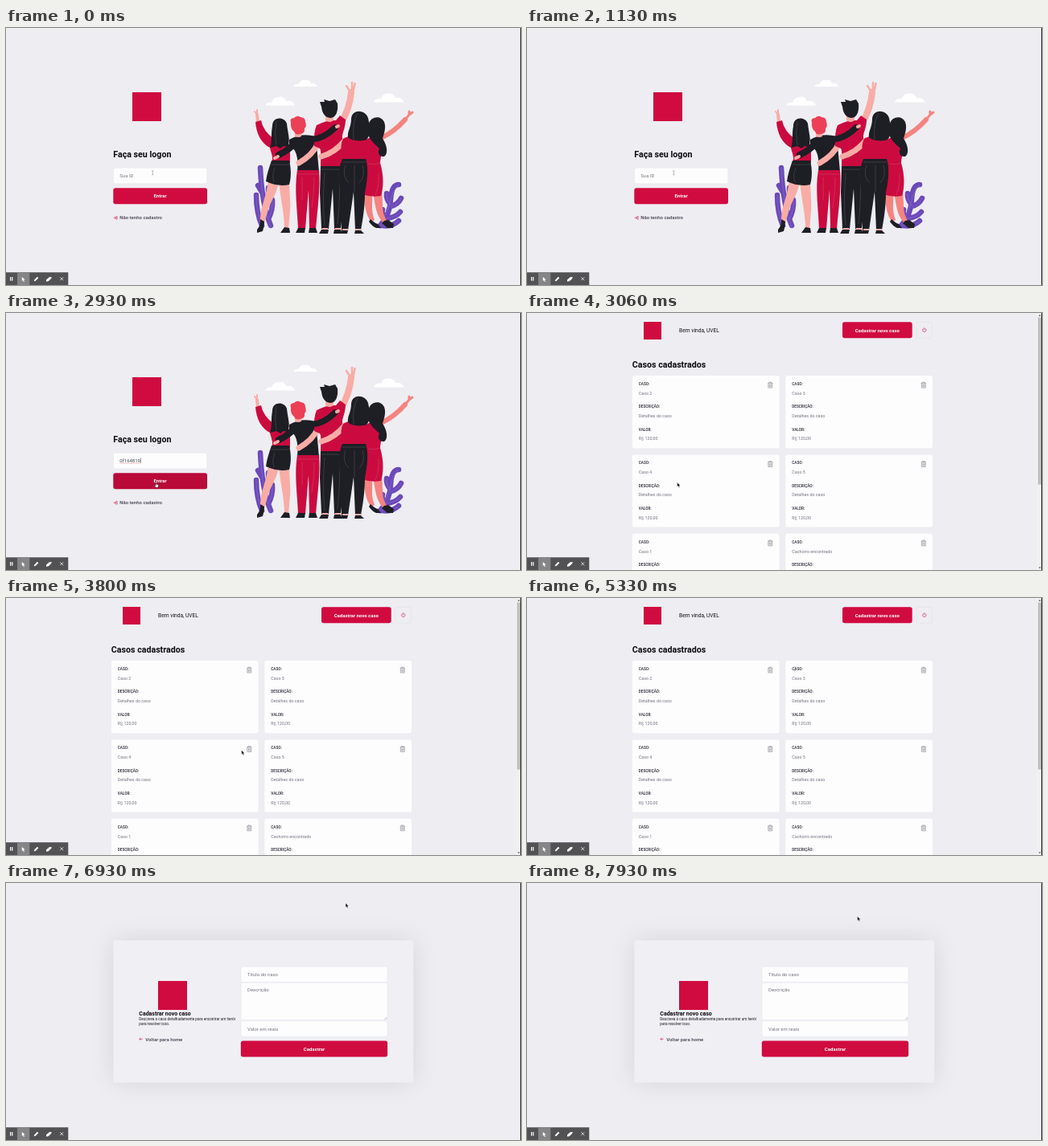
Animation, 640 px wide and 320 px high, one loop 8000 ms. Source, as an HTML page:

```html
<!DOCTYPE html>
<html lang="pt">
<head>
<meta charset="utf-8">
<title>Logon</title>
<style>
  html, body { margin: 0; width: 100%; height: 100%; overflow: hidden; background: #eeedf2; }
  svg { display: block; width: 100%; height: 100%; }
  text { font: 6px Roboto, sans-serif; fill: #737380; white-space: pre; }
  .h1 { font-size: 10.67px; font-weight: 700; fill: #0c0c10; }
  .button { font-weight: 700; fill: #fff; text-anchor: middle; }
  .link { font-weight: 500; fill: #41414d; }
  .label { font-size: 4.67px; font-weight: 700; fill: #41414d; }
  .value { font-size: 5.33px; }
  .small { font-size: 4.67px; fill: #13131a; }
  .field { fill: #fdfdfe; stroke: #dcdce6; stroke-width: .35; }
  .icon { fill: none; stroke: #d00b40; stroke-width: .6; stroke-linecap: round; stroke-linejoin: round; }
  .red { fill: #cb0b3f; }
  .black { fill: #1e1e25; }
  .skin { fill: #f8aca5; }
  .coral { fill: #f58480; }
  .limb { fill: none; stroke: #f8aca5; stroke-width: 6; stroke-linecap: round; stroke-linejoin: round; }
  .lobe { fill: none; stroke: #6b49b9; stroke-width: 6.5; stroke-linecap: round; }
  .seam { fill: none; stroke: #fff; stroke-opacity: .25; stroke-width: .5; }
</style>
</head>
<body>
<svg viewBox="0 0 640 320">
  <defs>
    <filter id="shadow" x="-30%" y="-50%" width="160%" height="200%"><feGaussianBlur stdDeviation="16"/></filter>
  </defs>

  <g id="login">
    <text class="h1" x="133.3" y="160.6">Faça seu logon</text>
    <rect class="field" x="133.5" y="174.2" width="116.3" height="19.6" rx="2.7"/>
    <text id="idText" x="141.3" y="186"></text>
    <path id="spell" fill="none" stroke="#e05050" stroke-width=".5" stroke-dasharray="1 .5"/>
    <path id="caret" stroke="#222" stroke-width=".5"/>
    <rect id="enter" x="133.3" y="199.3" width="116.7" height="20" rx="2.7"/>
    <text class="button" x="191.6" y="211.4">Entrar</text>
    <path class="icon" d="M134 236.300h2.700m-1.100-1.200l1.200 1.200-1.200 1.200m1.300-2.900h1.200v3.500h-1.200"/>
    <text class="link" x="141.200" y="238.400">Não tenho cadastro</text>

    <g id="clouds" fill="#fff">
      <path d="M357 73Q359 69 364 69.500Q366 64 372 65Q377 64 379 69Q385 68 387 73Z"/>
      <path d="M322 96.500Q324 92 330 92.500Q332 86 339 86Q345 84 348 91Q357 90 359 96.500Z"/>
      <path d="M457 92.500Q459 87 466 88Q468 81 475 81.500Q482 81 484 87Q492 86 495 92.500Z"/>
    </g>

    <g id="leaves">
      <path class="lobe" d="M329 246Q318 220 316 174M322 221Q327 212 326 199M326 238Q332 226 331 214M318 246Q311 230 311 208M319 206L313 196"/>
      <path class="lobe" d="M465 246Q477 233 478 214T488 195M478 220Q472 213 473 206M478 222Q487 220 491 212M471 236Q466 231 468 226M473 237Q484 236 490 229M467 246Q480 248 488 240"/>
      <path class="seam" d="M316 174Q318 220 329 248M326 199Q327 212 322 221M331 214Q332 226 326 238M311 208Q311 230 319 247M488 195Q479 205 478 214T464 248M473 206Q472 213 478 221M491 212Q487 220 478 223M490 229Q484 236 472 237M488 241Q480 246 467 246"/>
    </g>

    <g id="dressWoman">
      <path class="coral" d="M444 204H455C456 218 453 226 458 239L454 242C446 231 446 220 444 204ZM456 204H467C469 221 466 231 475 242L471 245C459 234 459 220 456 204Z"/>
      <path class="black" d="M453 238q5 5 9 6l4 5h-6q-6-3-9-8ZM470 240l5-1 7 5-1 5h-7l-7-6Z"/>
      <path class="limb" style="stroke:#f58480" d="M466 137Q483 129 496 114"/>
      <path class="limb" style="stroke:#f58480;stroke-width:3" d="M496 114L501 108l4-3M501 108l0-4"/>
      <path class="red" d="M446 140C452 135 464 133 469 139C470 151 465 160 465 168C470 185 469 200 466 209Q454 211 442 207Z"/>
      <path class="black" d="M451 119C453 110 466 108 470 117C473 125 469 133 468 138C474 146 475 157 470 160C464 161 461 155 464 150C460 146 451 139 449 130Z"/>
      <path class="seam" d="M465 168Q458 171 450 169M463 181Q464 197 459 208"/>
    </g>

    <g id="skirtWoman">
      <path class="skin" d="M326 188L339 190C337 207 329 215 326 226L321 243L316 240C316 221 324 211 326 188ZM339 190H352C352 202 354 218 353 228L351 251H346C346 230 341 214 339 190Z"/>
      <path class="black" d="M316 238l5 3q0 6-2 12l-7 2v-4q5-6 4-13ZM346 248l6 1 1 6h-12Z"/>
      <path class="limb" style="stroke-width:4" d="M313 117L312 108"/>
      <path class="limb" style="stroke-width:2" d="M312 108l-3-4M312 107l0-5"/>
      <path class="red" d="M310 117L317 115Q319 128 334 139L346 140Q352 142 353 150L353 168H330C333 161 329 155 328 149C317 144 311 131 310 117Z"/>
      <path class="black" d="M330 165H352C355 178 354 188 352 195Q338 198 323 191C324 182 327 174 330 165Z"/>
      <path class="black" d="M331 122C331 110 346 110 349 119C350 131 354 139 350 148L345 147 341 150 336 147 328 149C331 141 329 132 331 122Z"/>
      <path class="seam" d="M329 170h23M334 174Q330 184 333 192M336 116q-3 15 0 30"/>
    </g>

    <g id="redhead">
      <path class="black" d="M352 139Q367 130 385 135L389 179H362C364 160 360 150 352 146Z"/>
      <path class="red" d="M362 177H389C391 200 387 225 385 250H377L376 202 372 250H363C362 225 358 200 362 177Z"/>
      <path class="black" d="M363 249h9l-1 6h-11ZM377 249h8l2 6h-11Z"/>
      <path class="limb" style="stroke:#1e1e25;stroke-width:8" d="M364 139Q352 152 339 158"/>
      <path class="limb" style="stroke-width:4" d="M338 160l-4 2"/>
      <path class="skin" d="M359 127h8v8q-4 2-8 0Z"/>
      <path fill="#ec4057" d="M354 118Q352 112 358 112Q362 108 366 111Q372 111 372 117Q374 122 371 125Q372 132 365 132Q360 134 358 129Q353 125 354 118Z"/>
      <path class="seam" d="M363 182h25M368 186v28M383 186q0 20-3 38"/>
    </g>

    <g id="man">
      <path class="limb" style="stroke-width:8" d="M429 80Q427 101 416 119"/>
      <path class="limb" style="stroke-width:2.500" d="M427 78L423 72M430 76l0-8M432 77l1.500-8"/>
      <path class="limb" style="stroke-width:7" d="M387 145Q381 158 364 168"/>
      <path class="red" d="M386 121Q399 114 410 115L415 109 422 114C422 123 419 128 418 134L418 173H391C391 161 392 153 390 150L383 147Q382 130 386 121Z"/>
      <path class="skin" d="M397 106h10v9q-5 4-10 0Z"/>
      <path class="black" d="M392 98L390 92 396 92 395 89 402 91 409 89 412 94C413 104 410 111 404 112C398 112 393 108 392 98Z"/>
      <path class="black" d="M391 172H419L421 205 416 250H408L406 200 401 250H392L390 205Z"/>
      <path class="skin" d="M393 249h7v3h-7ZM409 249h7v3h-7Z"/>
      <path class="black" d="M392 251h9l-1 5h-11ZM408 251h8l1 5h-10Z"/>
      <path class="limb" style="stroke:#1e1e25;stroke-width:7.500" d="M379 139Q395 138 409 124"/>
      <path class="limb" style="stroke-width:4" d="M411 123l2-1"/>
      <path class="seam" d="M392 176h27M396 180q-3 35 0 66M414 180q2 25-2 64"/>
    </g>

    <g id="trouserWoman">
      <path class="limb" style="stroke-width:7" d="M421 140Q409 155 392 160"/>
      <path class="red" d="M419 138C428 132 443 132 448 140C451 150 446 156 447 165H418C418 155 414 148 419 138Z"/>
      <path class="black" d="M418 163H447C451 175 449 190 446 205C446 225 443 240 441 252H434L432 204 425 252H417C417 230 416 210 414 190C413 178 415 170 418 163Z"/>
      <path class="skin" d="M418 250h7v3h-7ZM434 250h7v3h-7Z"/>
      <path class="black" d="M417 252h8l-1 4h-10ZM434 252h7l4 4h-12Z"/>
      <path class="black" d="M429 113C430 101 446 101 450 112C452 122 454 133 448 139C440 142 428 140 425 136C424 128 429 124 429 113Z"/>
      <path class="seam" d="M418 167h29M422 171q-5 14 4 22M443 171q4 14-4 22M433 171v33M437 106q-7 12-5 33"/>
    </g>
  </g>

  <g id="list">
    <text x="189" y="23.700" style="font-size:6.670px;fill:#13131a">Bem vinda, UVEL</text>
    <rect id="newCase" x="392" y="11.300" width="86.700" height="20" rx="2.700"/>
    <text class="button" x="435.300" y="23.500">Cadastrar novo caso</text>
    <rect x="484" y="11.500" width="19.700" height="19.600" rx="1.500" fill="none" stroke="#dcdce6" stroke-width=".4"/>
    <path class="icon" d="M492.100 19.700a2.300 2.300 0 1 0 3.400 0M493.800 18.500v2.500"/>
    <text class="h1" x="130.800" y="67.700">Casos cadastrados</text>
    <g id="cards"></g>
    <rect x="634.300" width="5.700" height="320" fill="#f1f1f1"/>
    <rect x="635" y="5.500" width="4" height="208" fill="#c1c1c1"/>
    <path d="M635.700 3.800l1.500-1.800 1.500 1.800ZM635.700 316.500l1.500 1.800 1.500-1.800Z" fill="#555"/>
  </g>

  <g id="form">
    <rect x="133.300" y="71.300" width="373" height="177.300" rx="2.700" fill="#000" opacity=".1" filter="url(#shadow)"/>
    <rect x="133.300" y="71.300" width="373" height="177.300" rx="2.700" fill="#f0eff4"/>
    <text x="165.300" y="165.300" style="font-size:7px;font-weight:700;fill:#0c0c10">Cadastrar novo caso</text>
    <text class="small" x="165.300" y="171">Descreva o caso detalhadamente para encontrar um herói</text>
    <text class="small" x="165.300" y="176.500">para resolver isso.</text>
    <path class="icon" d="M169.300 194.300h-3.300m1.500-1.500l-1.500 1.500 1.500 1.500"/>
    <text class="link" x="173.200" y="196.500">Voltar para home</text>
    <rect class="field" x="292" y="104.200" width="182" height="19.400" rx="2.700"/>
    <text x="300" y="115.900">Título do caso</text>
    <rect class="field" x="292" y="124.200" width="182" height="46.200" rx="2.700"/>
    <text x="300" y="135.200">Descrição</text>
    <path d="M470.500 169.700l2.700-2.700M472 169.700l1.200-1.200" stroke="#777" stroke-width=".4"/>
    <rect class="field" x="292" y="171.800" width="182" height="19.400" rx="2.700"/>
    <text x="300" y="183.500">Valor em reais</text>
    <rect x="291.800" y="196.500" width="182.300" height="20" rx="2.700" fill="#d00b40"/>
    <text class="button" x="383" y="208.700">Cadastrar</text>
  </g>

  <rect x="639" width="1" height="320" fill="#3a3a3d"/>

  <g id="toolbar">
    <path d="M0 304.300H77.300V320H0Z" fill="#525254"/>
    <path d="M14 304.300H29.300V320H14Z" fill="#858587"/>
    <path d="M5 310h1.200v4.700h-1.200ZM7.200 310h1.200v4.700h-1.200ZM19.800 310l3.900 3.400-2 .2 1.200 2.200-.9.400-1.100-2.300-1.100 1.100ZM34.800 315.300l.4-1.800 3.700-3.700 1.400 1.400-3.700 3.700ZM50 313.500l3.700-3.300 3-.3-.5 2.200-3.500 3.200-2.700.4Z" fill="#fff"/>
    <path d="M67.400 310.400l3.800 3.800m0-3.800l-3.800 3.800" stroke="#fff" stroke-width=".8"/>
  </g>

  <g id="cursor">
    <path id="arrow" d="M0 0V5.300L1.200 4.200 2.100 6.200 3.100 5.800 2.200 3.900H3.900Z" fill="#111" stroke="#fff" stroke-width=".35"/>
    <path id="hand" d="M-.5 0Q0-.5.500 0V2.200L2.800 2.800V4.300L2 6.300H-.8L-2 3.900-1.500 3.300-.5 4Z" fill="#fff" stroke="#111" stroke-width=".5"/>
    <path id="beam" d="M-1.100-2.600Q0-2.600 0-2.100V2.100Q0 2.600-1.100 2.600M1.100-2.600Q0-2.600 0-2.100M0 2.100Q0 2.600 1.100 2.600" fill="none" stroke="#666" stroke-width=".45"/>
  </g>
</svg>
<script>
const LOOP = 8000, RED = '#d00b40', HOVER = '#b90a39';
const ID = '0f164819';
const PAGES = [['login', 0], ['list', 3000], ['form', 6900]];
// time, x, y of the pointer
const PATH = [
  [0, 182.3, 180.3], [2460, 182.3, 180.3], [2730, 186.7, 211], [3250, 186.7, 211],
  [3750, 292.7, 189.5], [3950, 292.7, 189.5], [4900, 333.3, 88.3], [5500, 333.3, 88.3],
  [6330, 419.6, 34], [6410, 419.6, 34], [6560, 422, 25], [7560, 422, 25], [7900, 410.6, 41.6]
];
// left, top, right, bottom, pointer shape
const ZONES = {
  login: [[133, 174, 250, 194, 'beam'], [133, 199, 250, 219, 'hand']],
  list: [[329, 85, 343, 92, 'beam'], [392, 11, 479, 31, 'hand']],
  form: []
};
const $ = id => document.getElementById(id);

function addMark(page, x, y, size) {
  $(page).insertAdjacentHTML('beforeend', `<rect x="${x}" y="${y}" width="${size}" height="${size}" fill="${RED}"/>`);
}
addMark('login', 157, 80, 36);
addMark('list', 145, 11, 22);
addMark('form', 189, 122, 36);

function card(name, i) {
  const x = i % 2 ? 321.3 : 130.8, y = 78 + Math.floor(i / 2) * 98.4;
  const rows = [['CASO:', name], ['DESCRIÇÃO:', 'Detalhes do caso'], ['VALOR:', 'R$ 120,00']];
  const texts = rows.map(([label, value], r) =>
    `<text class="label" x="8" y="${12 + r * 28.3}">${label}</text>
     <text class="value" x="8" y="${23.8 + r * 28.3}">${value}</text>`).join('');
  return `<g transform="translate(${x} ${y})">
    <rect width="182.700" height="90.200" rx="2.700" fill="#fdfdfe"/>${texts}
    <path d="M168.300 9.300h6.400M170 9.300v-1.200h3v1.200M169 9.300v5.800h5V9.300M170.700 11v2.700M172.300 11v2.700"
      fill="#a8a8b3" fill-opacity=".35" stroke="#a0a0aa" stroke-width=".7"/></g>`;
}
$('cards').innerHTML = ['Caso 2', 'Caso 3', 'Caso 4', 'Caso 5', 'Caso 1', 'Cachorro encontrado'].map(card).join('');

function pointerAt(t) {
  const next = PATH.findIndex(p => p[0] > t);
  if (next < 0) return PATH.at(-1).slice(1);
  const [t0, x0, y0] = PATH[next - 1], [t1, x1, y1] = PATH[next];
  const u = (t - t0) / (t1 - t0), e = u * u * (3 - 2 * u);
  return [x0 + (x1 - x0) * e, y0 + (y1 - y0) * e];
}

function drawInput(t) {
  const count = Math.max(0, Math.min(ID.length, Math.floor((t - 1460) / 95) + 1));
  const field = $('idText');
  field.textContent = count ? ID.slice(0, count) : 'Sua ID';
  field.style.fill = count ? '#444450' : '#757575';
  const end = 141.3 + (count ? field.getComputedTextLength() : 0);
  $('spell').setAttribute('d', count ? `M141.300 187.200H${end}` : '');
  $('caret').setAttribute('d', t >= 1330 ? `M${end + .4} 180.500V187` : '');
}

function draw(now) {
  const t = now % LOOP;
  const page = PAGES.findLast(p => t >= p[1])[0];
  for (const [id] of PAGES) $(id).style.display = id === page ? '' : 'none';
  if (page === 'login') drawInput(t);

  const [x, y] = pointerAt(t);
  const zone = ZONES[page].find(([l, top, r, b]) => x >= l && x <= r && y >= top && y <= b);
  const shape = zone ? zone[4] : 'arrow';
  for (const id of ['arrow', 'hand', 'beam']) $(id).style.display = id === shape ? '' : 'none';
  $('cursor').setAttribute('transform', `translate(${x} ${y})`);
  for (const id of ['enter', 'newCase']) $(id).setAttribute('fill', shape === 'hand' ? HOVER : RED);
}

const start = performance.now();
function tick() {
  draw(performance.now() - start);
  requestAnimationFrame(tick);
}
tick();
</script>
</body>
</html>
```
